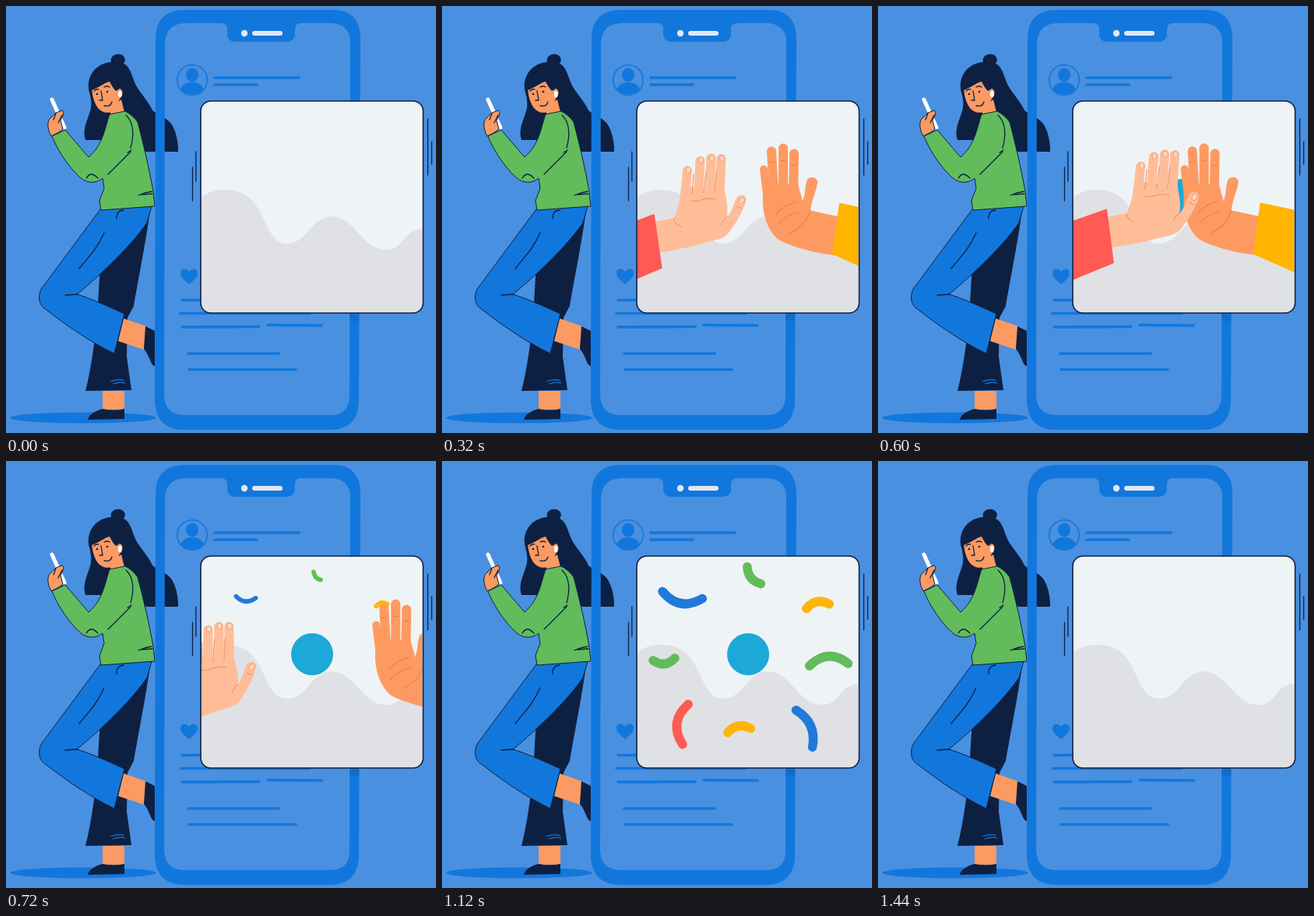
Write an HTML page that moves like this. It is 552 by 548 pixels and loops after 1680 ms.

```html
<!DOCTYPE html>
<html lang="en">
<head>
<meta charset="utf-8">
<title>High five</title>
<style>
  html, body { margin: 0; width: 100%; height: 100%; overflow: hidden; background: #4a90e0; }
  svg { display: block; width: 552px; height: 548px; }
  .ink { fill: #0e2042; }
  .blue { fill: #1277dc; }
  .skin { fill: #fb9a62; }
  .line { fill: none; stroke: #0e2042; stroke-width: 1.3; stroke-linecap: round; stroke-linejoin: round; }
  .edge { stroke: #0e2042; stroke-width: 1; stroke-linejoin: round; }
  .text { fill: none; stroke: #1277dc; stroke-width: 3.6; stroke-linecap: round; }
  .finger { fill: none; stroke-linecap: round; stroke-width: 12; }
  .crease { fill: none; stroke-width: 1.1; stroke-linecap: round; }
</style>
</head>
<body>
<svg viewBox="0 0 552 548">
  <defs>
    <clipPath id="inside"><rect x="250.5" y="122.5" width="284" height="271" rx="12"/></clipPath>
  </defs>
  <rect width="552" height="548" fill="#4a90e0"/>

  <g id="woman">
    <ellipse class="blue" cx="99" cy="528.5" rx="94" ry="7"/>
    <path class="ink" d="M106 106C104 87 118 73 135 72C133 66 139 61 146 62C152 63 155 69 151 74C159 77 161 88 166 100C172 112 183 122 188 134C194 140 205 142 212 151C218 160 221 172 221 187H180L140 172H102C98 160 103 150 107 138C112 126 108 116 106 106Z"/>
    <path class="ink" d="M185 262C180 300 170 350 164 385L156 400L155 450L161 493L102 494C108 470 113 440 117 400L121 330Z"/>
    <path d="M134 482Q145 478 152 481M137 485Q146 482 153 484" fill="none" stroke="#1277dc" stroke-width="1.3"/>
    <path class="skin" d="M124 494H152V518H124Z"/>
    <path class="ink" d="M105 531C106 524 116 519 124 517Q138 520 152 517V530Z"/>
    <path class="skin" d="M151 401L180 411L177 441L144 430Z"/>
    <path class="ink" d="M179 411L191 417V462C186 462 185 450 177 440Z"/>
    <path class="blue edge" d="M121 261C103 285 64 338 46 362C40 372 42 385 52 390C80 412 110 432 139 446L152 395C130 385 108 375 91 370C123 344 163 305 181 278L187 257Z"/>
    <path class="line" d="M151 262Q142 262 142 273M126 291C117 312 105 323 94 337M76 371L92 370"/>
    <path class="skin" d="M133 130L148 120L153 140L135 144Z"/>
    <path class="skin" d="M110 106C111 118 115 131 123 135C130 139 138 136 141 131L146 119C152 114 150 104 143 106L138 93L122 95Z"/>
    <path class="ink" d="M106 109C110 97 119 91 136 90C142 92 145 98 145 107L141 109C138 106 135 101 133 97C127 98 117 106 110 108Z"/>
    <rect x="144" y="109" width="4.5" height="8" rx="2.2" fill="#fff"/>
    <path class="line" d="M113 109Q116 106 119 107M126 104Q130 102 133 104M122 109L124 121L120 121M126 128Q134 130 136 123"/>
    <circle class="ink" cx="117" cy="113" r="1.3"/>
    <circle class="ink" cx="130" cy="110" r="1.3"/>
    <path d="M59 120L75 156" stroke="#fff" stroke-width="5" stroke-linecap="round"/>
    <path class="skin edge" d="M58 167C52 156 53 146 58 143L64 137L72 134Q75 136 73 141L70 147L73 158L68 162Z"/>
    <path class="line" d="M64 138L61 146M72 140L67 150"/>
    <path class="edge" fill="#62bc5b" d="M133 139L153 135C159 138 165 143 169 149C176 175 184 210 189 238L191 257L122 262L120 250L126 234L124 221C116 228 104 228 95 220C80 206 66 185 59 167L76 159L106 194C125 178 127 156 133 139Z"/>
    <path class="line" d="M154 140C165 150 164 168 160 182M131 216L160 187M161 185L156 188M103 221Q109 211 118 221M170 243Q179 239 187 238M174 242L188 241"/>
  </g>

  <g id="phone">
    <path class="blue" fill-rule="evenodd" d="M230 5H420Q455 5 455 42L453 505Q453 544 415 544H230Q191 544 191 505L192 42Q192 5 230 5ZM232 22H276Q284 22 284 30V36Q284 46 296 46H358Q371 46 371 36V30Q371 22 379 22H418Q442 24 442 46L441 500Q441 525 416 525H230Q203 525 203 498L204 50Q204 22 232 22Z"/>
    <rect x="441" y="394" width="12.5" height="10" fill="#0e2042" opacity=".12"/>
    <circle cx="306" cy="35" r="4.2" fill="#e2e8f3"/>
    <rect x="316" y="32" width="39" height="6" rx="3" fill="#e2e8f3"/>
    <circle cx="239" cy="95" r="19.3" fill="none" stroke="#1277dc" stroke-width="1.6"/>
    <ellipse class="blue" cx="239" cy="88.5" rx="8" ry="9"/>
    <path class="blue" d="M224 107C227 100 232 98 239 98S251 100 254 107Q248 113 239 113T224 107Z"/>
    <path class="text" d="M268 92H376M268 101H322M226 377.5H260M224 394.5H390M226 412L325 411.5M336 409.5L405 410M234 446H350M235 466.5H372"/>
    <path class="blue" d="M235 357C228 351 224 348 224 343C224 336 232 336 235 341C238 336 246 336 246 343C246 348 242 351 235 357Z"/>
  </g>

  <path class="line" d="M239.500 207V250M243.800 187V225M541.500 145V217M546.500 174V203"/>

  <rect x="250" y="122" width="285.5" height="272" rx="13" fill="#eef3f5"/>
  <g clip-path="url(#inside)">
    <path fill="#e0e1e5" d="M250 246C260 238 270 236 282 236C304 236 317 246 326 264C337 286 343 305 361 305C387 305 392 270 418 270C448 270 457 313 488 313C512 313 508 287 536 286V395H250Z"/>
    <circle id="badge" r="27" fill="#1ca8d8"/>
    <g id="right">
      <path fill="#fd9a62" d="M377 242L385 228H422L428 250C432 241 430 232 434 222C440 217 448 220 447 227C445 239 439 250 438 262L480 271L476 320C450 318 420 311 398 300C384 290 375 267 377 242Z"/>
      <path class="finger" stroke="#fd9a62" d="M388 186L391 240M403 182L403 240M417 189L416 242"/>
      <path class="finger" style="stroke-width:10" stroke="#fd9a62" d="M378 209L383 250"/>
      <path class="crease" stroke="#e5814c" d="M394 267Q404 254 420 251M396 280Q405 268 422 264M412 291Q432 282 438 262M385 200H391M400 198H406M414 204H420"/>
      <path fill="#ffb400" d="M475 252L540 266V351L466 318Z"/>
    </g>
    <g id="left">
      <path fill="#ffbd97" d="M308 266L336 261C342 250 345 236 347 220L402 228C405 243 406 253 404 262C411 256 413 243 418 237C423 232 431 235 429 242C425 256 414 272 405 283C398 291 385 291 375 294C360 298 340 302 314 305Z"/>
      <path class="finger" stroke="#ffbd97" d="M355 201L350 242M372 189L367 242M386 186L382 242M399 187L395 242"/>
      <path class="crease" stroke="#ec946b" d="M363 205L360 231M379 202L375 230M392.500 202L389 230M358 239Q363 242 372 239T391 239M336 262Q337 268 342 271M338 268L345 273M396 272Q398 266 404 262M417 248Q420 251 424 251"/>
      <g fill="#ffd4bd" stroke="#ec946b" stroke-width=".8">
        <rect x="353.5" y="196" width="6" height="8" rx="3"/>
        <rect x="370" y="184" width="6" height="8" rx="3"/>
        <rect x="384" y="181.5" width="6" height="8" rx="3"/>
        <rect x="397" y="182.5" width="6" height="8" rx="3"/>
        <rect x="421" y="237" width="6" height="9" rx="3" transform="rotate(30 424 241)"/>
      </g>
      <path fill="#ff5a54" d="M240 279L311 255L319 325L240 356Z"/>
    </g>
    <g id="confetti" fill="none" stroke-width="11.6" stroke-linecap="round"></g>
  </g>
  <rect x="250" y="122" width="285.5" height="272" rx="13" fill="none" stroke="#0e2042" stroke-width="1.6"/>
</svg>
<script>
const LOOP = 1680, STEP = 40;
const BLUE = '#1f7ad9', GREEN = '#62bc5b', AMBER = '#ffb40a', RED = '#ff5a54';
const $ = id => document.getElementById(id);
const clamp = v => Math.min(1, Math.max(0, v));
const easeOut = p => 1 - (1 - p) ** 3;

// x, y, half length, bulge, angle, turn, start time, colour
const pieces = [
  [307.7, 177.5, 26, 11, 5, 10, 680, BLUE],
  [398.6, 148.2, 14, 5, 48, 7, 680, GREEN],
  [481.9, 183.6, 15, -6, -12, 2, 680, AMBER],
  [285.3, 257.5, 14, 6, -6, 0, 720, GREEN],
  [496.2, 256, 25, -11, -8, 9, 720, GREEN],
  [307, 337.2, 26, 11, 98, 0, 720, RED],
  [381, 343, 15, -6, -11, 1, 720, AMBER],
  [469.1, 341.7, 26, -9, 67, -2, 720, BLUE]
].map(([x, y, w, b, angle, turn, start, color]) => {
  const el = document.createElementNS('http://www.w3.org/2000/svg', 'path');
  el.setAttribute('d', `M${-w} ${-b / 2}Q0 ${1.5 * b} ${w} ${-b / 2}`);
  el.setAttribute('stroke', color);
  $('confetti').append(el);
  return { el, x, y, angle, turn, start };
});

function place(el, x, y, scale, angle = 0) {
  el.setAttribute('transform', `translate(${x} ${y}) rotate(${angle}) scale(${scale})`);
  el.setAttribute('visibility', scale > 0.01 ? 'visible' : 'hidden');
}

function moveHand(el, x, y, angle) {
  el.setAttribute('transform', `translate(${x} ${y}) rotate(${angle} 385 255)`);
}

function draw(t) {
  // Hands meet at 480 ms and rest together for 80 ms
  const gap = Math.max(0, (Math.abs(t - 480) - 40) / 240) ** 2;
  moveHand($('left'), -154 * gap, 38 * gap, -7 * gap);
  moveHand($('right'), 140 * gap, 2 * gap, 0);

  const leave = 1 - clamp((t - 1280) / 160) ** 2;
  place($('badge'), 393, 248, easeOut(clamp((t - 480) / 160)) * leave);
  const spin = clamp((t - 960) / 320);
  for (const p of pieces) {
    const grow = easeOut(clamp((t - p.start) / 200));
    place(p.el, p.x, p.y, grow * leave, p.angle + p.turn * spin);
  }
}

function tick() {
  const t = performance.now() % LOOP;
  draw(Math.floor(t / STEP) * STEP);
  requestAnimationFrame(tick);
}
tick();
</script>
</body>
</html>
```
